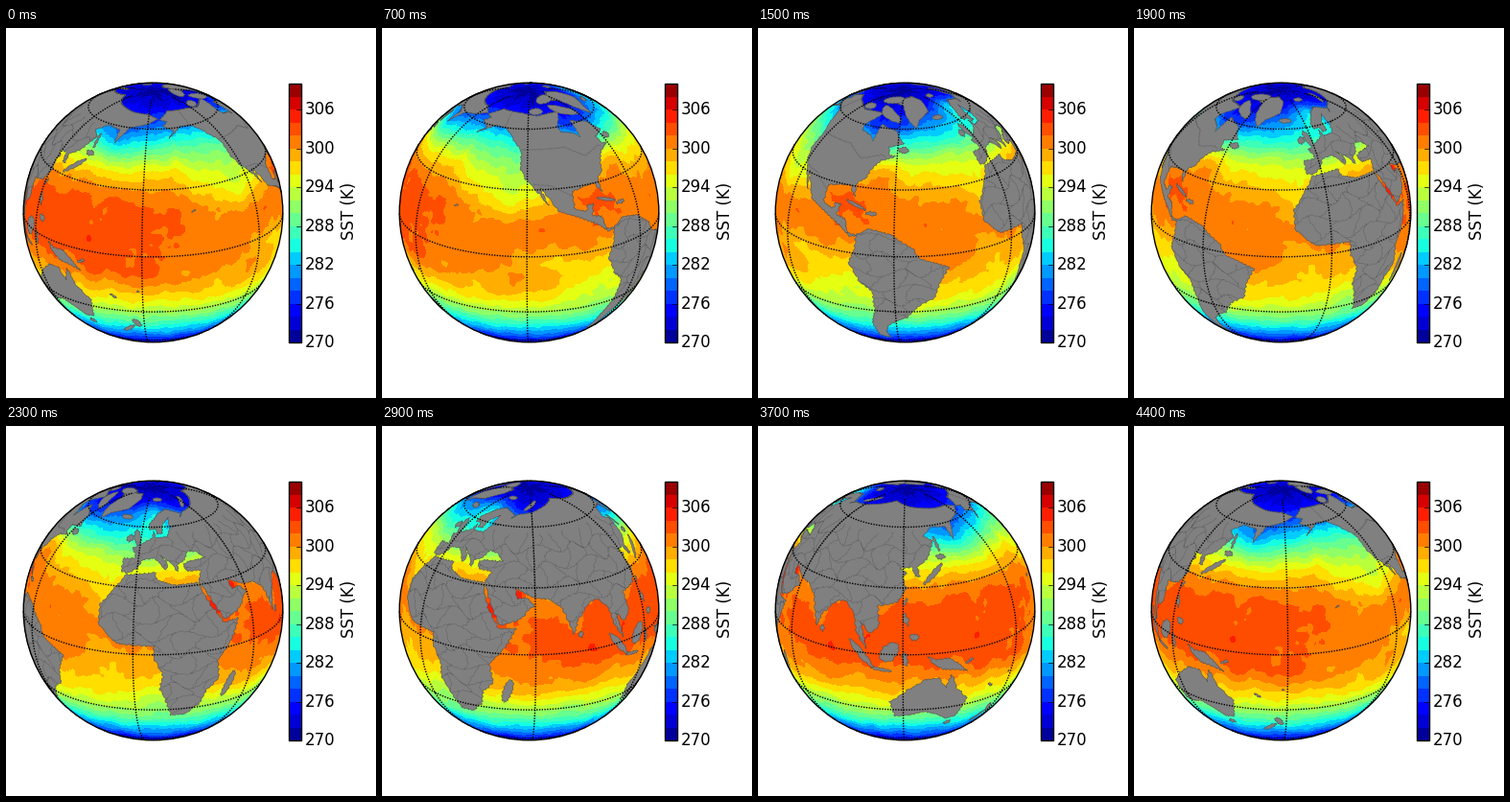
A matplotlib script that plays this animation: 386 px wide and 386 px high, repeating every 4500 ms.

```python
import numpy as np
import matplotlib.pyplot as plt
from matplotlib.animation import FuncAnimation
from matplotlib.collections import PolyCollection
from matplotlib.patches import Circle, Rectangle
from matplotlib.path import Path

SIZE, FRAMES = 386, 45
CX, CY, R = 153.5, 192.5, 135.3
TILT = np.radians(20)
START_LON = 185
LEVELS = 20
JET = plt.get_cmap("jet")((np.arange(LEVELS) + .5) / LEVELS)

plt.rcParams["font.family"] = "DejaVu Sans"


# ---- sea surface temperature -------------------------------------------
def blur(a, s):
    fy, fx = (np.fft.fftfreq(n) for n in a.shape)
    g = np.exp(-2 * np.pi**2 * s**2 * (fy[:, None]**2 + fx**2))
    return np.fft.ifft2(np.fft.fft2(a) * g).real


def sea_levels():
    """Colour index on a half-degree grid: zonal bell, regional bumps, noise."""
    rng = np.random.default_rng(4)
    lon, lat = np.meshgrid(np.arange(720) / 2, np.arange(361) / 2 - 90)
    width = np.where(lat > 8, 50, 54)
    t = 271 + 30.3 * np.exp(-np.abs((lat - 8) / width)**3)

    def bump(x, y, sx, sy, amp):
        dx = (lon - x + 180) % 360 - 180
        t[:] += amp * np.exp(-(dx / sx)**2 - ((lat - y) / sy)**2)

    bump(140, 14, 50, 22, 2.3)     # western Pacific warm pool
    bump(185, -9, 25, 7, 1.3)      # south Pacific convergence
    bump(80, 2, 30, 14, 1.8)       # Indian Ocean
    bump(245, 12, 32, 4, 1)        # equatorial convergence
    bump(255, -3, 30, 6, -2.3)     # cold tongue
    bump(277, -15, 22, 14, -4)     # Peru
    bump(232, 30, 22, 13, -5)      # California
    bump(158, 52, 18, 10, -4)      # Okhotsk
    bump(275, 25, 18, 9, 2.3)      # Gulf of Mexico
    bump(292, 38, 12, 6, 3)        # Gulf Stream
    bump(285, 58, 18, 9, -4)       # Labrador and Hudson
    bump(10, 68, 30, 10, 7)        # North Atlantic drift
    bump(343, 24, 12, 11, -2.5)    # Canary
    bump(355, -8, 28, 13, -2.5)    # south Atlantic
    bump(12, -24, 8, 12, -3)       # Benguela
    bump(39, 20, 6, 9, 4)          # Red Sea
    bump(51, 27, 4, 4, 6)          # Persian Gulf
    for scale, amp in ((2.5, .25), (7, .35)):
        noise = blur(rng.normal(size=t.shape), scale)
        t += amp * noise / noise.std()
    return np.clip((t - 270) / 2, 0, LEVELS - 1).astype(int)


# ---- coasts -------------------------------------------------------------
def rough(x, y):
    """Ragged detail that depends on position only, so shared edges agree."""
    return np.column_stack([
        x + .35 * np.sin(2.3 * y + 1.1 * x) + .2 * np.sin(5.1 * y - 3.7 * x),
        y + .25 * np.sin(2.7 * x - 1.3 * y) + .15 * np.sin(4.9 * x + 3.1 * y)])


def trace(flat, closed=False):
    p = np.reshape(flat, (-1, 2)).astype(float)
    if closed:
        p = np.vstack([p, p[:1]])
    out = []
    for a, b in zip(p[:-1], p[1:]):
        n = int(np.ceil(np.abs(b - a).max() / .6))
        out.append(a + (b - a) * np.arange(n)[:, None] / n)
    return rough(*np.vstack(out + [p[-1:]]).T)


def land(*flat):
    shape = trace(flat, closed=True)
    lands.append(shape)
    return shape


def isle(lon, lat, length, width, tilt=0):
    """Island as a ragged ellipse; half axes in degrees of arc."""
    a, k = np.linspace(0, 2 * np.pi, 40), np.radians(tilt)
    u, v = length * np.cos(a), width * np.sin(a)
    x = (u * np.cos(k) - v * np.sin(k)) / np.cos(np.radians(lat))
    lands.append(rough(lon + x, lat + u * np.sin(k) + v * np.cos(k)))


lands = []
land(-168, 65.6, -156, 71, -128, 70, -110, 68, -95, 69, -82, 69, -87, 65, -94, 60,
     -92, 57, -82, 55, -79, 52, -78, 58, -77, 62, -69, 60, -63, 59, -56, 52, -66, 50,
     -65, 46, -61, 45.5, -70, 43, -75, 38, -76, 35, -81, 31, -80.5, 25.5, -84, 30,
     -90, 29.5, -97, 28, -97, 20, -91, 18.5, -90, 21, -87, 21, -88.5, 16, -83.5, 15,
     -82, 9, -77.5, 8.5, -80, 7.3, -86, 11.5, -95, 16, -105, 20, -109, 26,
     -113.5, 31, -109.8, 23, -116, 30.5, -120.6, 34.5, -124, 40, -124, 48, -133, 56,
     -140, 60, -150, 60.5, -163, 54.7, -157, 58.5, -166, 61.5, -161, 64)
land(-70, 77, -58, 75.5, -53, 67, -45, 60, -40, 65, -24, 70, -18, 79, -30, 83,
     -60, 81.5)
south_america = land(
    -77.5, 8.5, -72, 12, -61, 10, -51, 3, -49, -1, -35, -6, -39, -14, -41, -22,
    -48, -26, -54, -34, -58, -36, -65, -41, -67, -47, -66, -55, -73, -52, -74, -40,
    -70.5, -30, -70.4, -18.5, -76, -14, -81, -5, -78, 2)
africa = land(
    -6, 35.5, 10, 37, 11, 33.5, 20, 31, 32.5, 31, 37, 20.5, 43, 11.5, 51, 11.8,
    47, 4, 39, -5.5, 40.5, -15, 35, -20, 32.5, -28, 26, -34, 18.5, -34, 14.5, -22.5,
    12, -17, 13.5, -10, 9, -1, 9.5, 4, -7.5, 4.5, -16.5, 12, -17, 21, -10, 30)
europe = land(
    -9, 37, -9, 43, -1.5, 43.5, -4.5, 48.3, 4, 52, 8.5, 54, 9.5, 57.5, 11, 54,
    20, 54.5, 23, 59, 30, 60, 23, 60, 25, 65.5, 17, 61, 16.5, 56.5, 12.5, 56, 11, 59,
    6, 58.5, 5.5, 62, 15, 68.5, 26, 71, 41, 67, 38, 64.5, 44, 67.5, 60, 69, 60, 25.5,
    57, 26.8, 50, 30, 51, 25, 56, 25.5, 59.5, 22.5, 52, 15.5, 43.5, 12.8, 35, 28.5,
    33, 31, 36, 36.5, 28, 36.8, 26.5, 40, 30, 41.2, 41.5, 41.7, 37, 45.3, 31, 46.3,
    28, 42, 23.5, 40.5, 23, 36.8, 19.5, 41.5, 13.5, 45.3, 18, 40, 16, 38, 10, 44,
    3, 43, 0, 39, -5.5, 36.2)
asia = land(
    60, 69, 75, 72, 104, 77.5, 128, 73, 160, 69.7, 180, 69, 190, 66, 178, 62.5,
    164, 60, 157, 51, 156, 58, 143, 59.3, 135, 54.7, 141, 52, 135, 43.5, 128, 39.5,
    129, 35, 126.5, 35, 125, 39.5, 118, 39, 122, 37, 119.5, 34.5, 121.8, 30,
    117, 23.5, 108, 21.5, 109, 12.5, 105, 9, 100.5, 13.5, 103.5, 2, 98.5, 9,
    97, 16.5, 92, 22, 87, 21.5, 80, 14.5, 77.5, 8.2, 73, 20, 67, 24.8, 60, 25.5)
land(142.5, -11, 146, -19, 153, -26, 150, -37.5, 144, -38.5, 138, -34, 131, -31.5,
     124, -33.5, 115.5, -34.5, 113.5, -25, 122, -18, 130, -12.5, 136.5, -12.2,
     140, -17.5)
land(131, -1, 135, -3, 141, -2.6, 150.5, -10.3, 143, -8.5, 138, -8, 133, -4)

isle(-74, 69, 7, 2.6, -45)       # Baffin
isle(-80, 79.5, 4.5, 3, 30)      # Ellesmere
isle(-110, 71, 3, 2.2)           # Victoria
isle(-56, 48.7, 2.2, 1.5)        # Newfoundland
isle(-79, 21.7, 5, .6, -18)      # Cuba
isle(-71, 18.8, 2.5, .8)         # Hispaniola
isle(-155.6, 19.7, .6, .5)       # Hawaii
isle(-18.8, 65, 2.6, 1.4)        # Iceland
isle(-2.8, 54, 4.4, 1.3, 105)    # Britain
isle(-8, 53.3, 1.9, 1.4, 70)     # Ireland
isle(18, 78.7, 2, 1.5)           # Svalbard
isle(60, 74, 4.5, .9, 55)        # Novaya Zemlya
isle(46.8, -19, 6.8, 1.9, 72)    # Madagascar
isle(80.8, 7.8, 1.6, .9, 100)    # Sri Lanka
isle(136.8, 35.8, 6.6, 1.1, 42)  # Honshu
isle(143, 43.4, 1.9, 1.3)        # Hokkaido
isle(142.8, 50, 4, .6, 95)       # Sakhalin
isle(121, 23.7, 1.6, .6, 70)     # Taiwan
isle(121.3, 16, 2.8, 1, 105)     # Luzon
isle(125, 8, 1.9, 1.4)           # Mindanao
isle(114, 1, 5.2, 3.3, 50)       # Borneo
isle(101, -.5, 8, 1.5, -48)      # Sumatra
isle(110, -7.4, 4.6, .7, -8)     # Java
isle(121, -2, 3.6, 1, 100)       # Sulawesi
isle(151, -5.5, 2, .5, 20)       # New Britain
isle(146.7, -42, 1.6, 1.4)       # Tasmania
isle(176, -38.7, 3.2, 1.3, 115)  # New Zealand
isle(170.3, -43.7, 4, 1.1, 47)
isle(165.5, -21.3, 1.9, .4, -40)  # New Caledonia
isle(178, -17.8, .7, .4)         # Fiji


def joined(paths):
    gap = np.full((1, 2), np.nan)
    return np.vstack([q for p in paths for q in (p, gap)])


def frontiers():
    """Warped brick pattern kept inside the continents, plus three borders."""
    bricks = []
    for row, lat in enumerate(range(-32, 56, 8)):
        bricks.append(trace([-90, lat, 150, lat]))
        for lon in np.arange(-90 + 5.5 * (row % 2), 150, 11):
            bricks.append(trace([lon, lat, lon, lat + 8]))
    net = joined(bricks)
    x, y = net.T
    net = np.column_stack([x + 3 * np.sin(.35 * y + .13 * x),
                           y + 2.2 * np.sin(.27 * x + .2 * y)])
    inside = np.any([Path(s).contains_points(net)
                     for s in (south_america, africa, europe, asia)], axis=0)
    net[~inside] = np.nan
    return joined([net,
                   trace([-124, 49, -95, 49, -83, 43, -70, 46, -67, 45]),
                   trace([-117, 32.5, -107, 31.5, -97, 26]),
                   trace([-141, 69.5, -141, 60])])


def graticule():
    t, u = np.arange(0, 361, 2), np.arange(-80, 81, 2)
    rings = [np.column_stack([t, 0 * t + lat]) for lat in range(-60, 61, 30)]
    arcs = [np.column_stack([0 * u + lon, u]) for lon in range(0, 360, 60)]
    return joined(rings + arcs)


# ---- projection ---------------------------------------------------------
def project(p, lon0):
    """Orthographic unit-disc x, y and depth."""
    lon, lat = np.radians(p[:, 0] - lon0), np.radians(p[:, 1])
    c = np.cos(lat) * np.cos(lon)
    s = np.sin(lat)
    return (np.cos(lat) * np.sin(lon),
            s * np.cos(TILT) - c * np.sin(TILT),
            s * np.sin(TILT) + c * np.cos(TILT))


def to_px(x, y):
    return CX + R * x, CY - R * y


def visible_line(p, lon0):
    x, y, z = project(p, lon0)
    return to_px(np.where(z > 0, x, np.nan), y)


LEVEL, GRID, BORDERS = sea_levels(), graticule(), frontiers()

# Latitude and relative longitude of every pixel on the disc
px, py = np.meshgrid(np.arange(SIZE) + .5, np.arange(SIZE) + .5)
ux, uy = (px - CX) / R, (CY - py) / R
DISC = ux**2 + uy**2 < 1
ux, uy = ux[DISC], uy[DISC]
uz = np.sqrt(1 - ux**2 - uy**2)
LAT = np.degrees(np.arcsin(uy * np.cos(TILT) + uz * np.sin(TILT)))
LON = np.degrees(np.arctan2(ux, uz * np.cos(TILT) - uy * np.sin(TILT)))
ROW = np.rint((LAT + 90) * 2).astype(int)

# ---- figure -------------------------------------------------------------
fig = plt.figure(figsize=(SIZE / 100, SIZE / 100), dpi=100, facecolor="white")
ax = fig.add_axes([0, 0, 1, 1])
ax.axis("off")

pixels = np.ones((SIZE, SIZE, 4))
ocean = ax.imshow(pixels, extent=(0, SIZE, SIZE, 0), interpolation="nearest",
                  aspect="auto")
ground = PolyCollection([], facecolor="#808080", edgecolor="#505050", linewidth=.4)
ax.add_collection(ground)
frontier, = ax.plot([], [], color="#5c5c62", lw=.3)
grid, = ax.plot([], [], color="black", lw=1, ls=(0, (1, 1)), dash_capstyle="butt")
ax.add_patch(Circle((CX, CY), R, fill=False, ec="black", lw=1, zorder=5))

bx, by, bw, bh = 294.5, 58, 13.5, 270
step = bh / LEVELS
for k, color in enumerate(JET):
    ax.add_patch(Rectangle((bx, by + bh - (k + 1) * step), bw, step, fc=color, lw=0))
ax.add_patch(Rectangle((bx, by), bw, bh, fill=False, ec="black", lw=1, zorder=5))
for k in range(270, 307, 6):
    y = by + bh * (310 - k) / 40
    ax.plot([bx + bw - 5.5, bx + bw], [y, y], color="black", lw=.5)
    ax.text(312, y - 1.7, str(k), size=12, va="center_baseline")
ax.text(358.4, 191, "SST (K)", size=12, rotation=90, ha="center", va="center")
ax.set(xlim=(0, SIZE), ylim=(SIZE, 0))


def draw(i):
    lon0 = START_LON + 360 * i / FRAMES
    col = np.rint((LON + lon0) * 2).astype(int) % 720
    pixels[DISC] = JET[LEVEL[ROW, col]]
    ocean.set_data(pixels)

    shapes = []
    for p in lands:
        x, y, z = project(p, lon0)
        if z.max() > 0:
            # points behind the globe slide to its rim
            r = np.where(z < 0, np.hypot(x, y), 1)
            shapes.append(np.column_stack(to_px(x / r, y / r)))
    ground.set_verts(shapes)
    frontier.set_data(*visible_line(BORDERS, lon0))
    grid.set_data(*visible_line(GRID, lon0))
    return ocean, ground, frontier, grid


anim = FuncAnimation(fig, draw, frames=FRAMES, interval=100, repeat=True,
                     repeat_delay=0)
plt.show()
```
